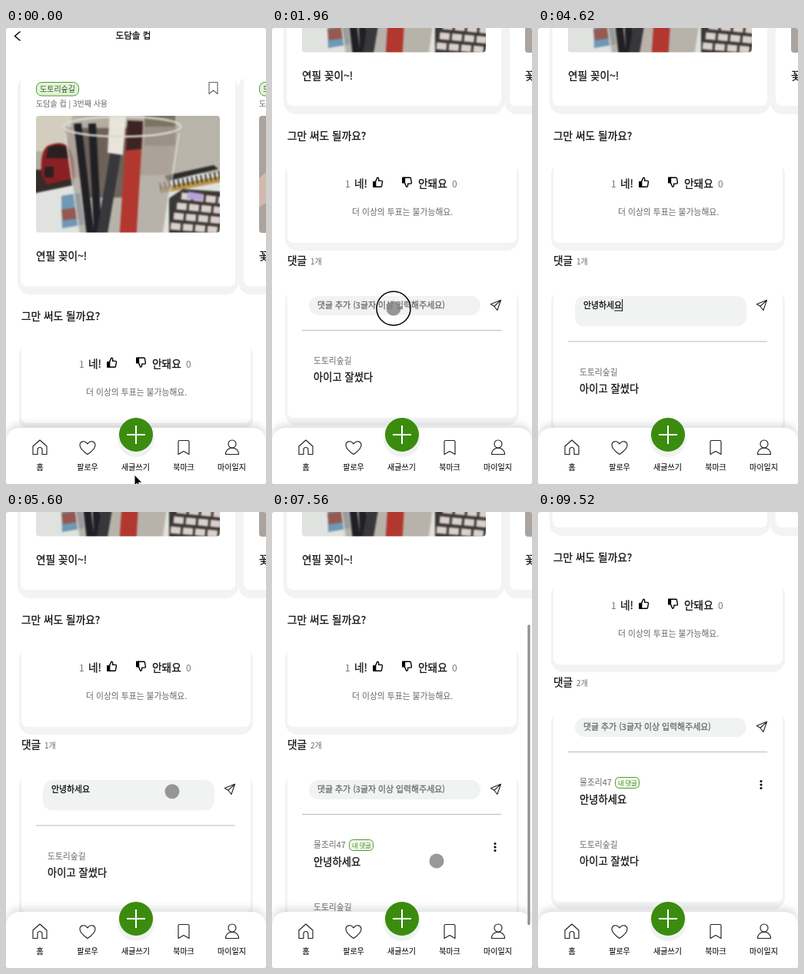
Recreate the animation shown at these times as an HTML page. Size 338 by 592 pixels, loop 9870 ms.

```html
<!DOCTYPE html>
<html lang="ko">
<head>
<meta charset="utf-8">
<style>
html, body { margin: 0; width: 100%; height: 100%; overflow: hidden; background: #c4c4c4 }
svg { display: block; width: 338px; height: 592px; background: #fff; border-radius: 3px;
  font-family: "Noto Sans CJK KR", "Noto Sans CJK", "Noto Sans CJK JP", sans-serif }
text { fill: #111 }
.card { fill: #fff }
.halo { fill: #f2f4f3 }
.bar { fill: #fff; filter: drop-shadow(0 -5px 5px rgba(20, 40, 40, .14)) }
.big, .body, .title, #input { stroke: #111; stroke-width: .28px }
.big { font-size: 13.7px }
.body { font-size: 13.3px }
.title { font-size: 11.6px; text-anchor: middle }
.name { font-size: 10.8px; fill: #666 }
.small { font-size: 10px; fill: #666 }
.vote { font-size: 12px; fill: #777 }
.nav { font-size: 10px; text-anchor: middle; stroke: #111; stroke-width: .12px }
.line { fill: none; stroke: #222; stroke-width: 1.15; stroke-linecap: round; stroke-linejoin: round }
.photo { filter: blur(.8px) }
</style>
</head>
<body>
<svg viewBox="0 0 338 592">
  <defs>
    <clipPath id="frame"><rect x="39" y="114" width="239" height="151.500" rx="4"/></clipPath>
    <g id="thumb" stroke="#000" stroke-width="2.3" stroke-linejoin="round">
      <path d="M7 22H2.500V11H7z"/>
      <path fill="none" d="M7 11l4-9a3 3 0 0 1 3 3v4h6a2 2 0 0 1 2 2l-1.500 9a2 2 0 0 1-2 2H7z"/>
    </g>
    <g id="tag">
      <rect x="39.500" y="70.500" width="55" height="17.500" rx="7" fill="#e2f3d8" stroke="#4b9a2c"/>
      <text x="44" y="83" font-size="10" style="fill:#3b5a2c">도토리숲길</text>
      <text x="39" y="102" class="small">도담솔 컵 | 3번째 사용</text>
    </g>
  </defs>

  <g id="page">
    <path class="line" style="stroke:#000;stroke-width:1.6" d="M18 5l-6.500 5.500 6.500 5.500"/>
    <text x="165.500" y="14" class="title">도담솔 컵</text>

    <rect class="halo" x="15" y="62" width="287" height="284" rx="16"/>
    <rect class="halo" x="302" y="62" width="290" height="284" rx="16"/>
    <rect class="card" x="19" y="50" width="279" height="285" rx="8"/>
    <rect class="card" x="309" y="50" width="279" height="285" rx="8"/>
    <use href="#tag"/>
    <use href="#tag" x="290"/>
    <path class="line" style="stroke:#666" d="M264 70.500h11v15l-5.500-4.500-5.500 4.500z"/>

    <g clip-path="url(#frame)"><g class="photo">
      <path fill="#b5ada0" d="M30 105h260v170H30z"/>
      <path fill="#d3cdbf" d="M30 105h58l-10 55H30z"/>
      <path fill="#b9b4a9" d="M212 105h78v90h-78z"/>
      <path fill="#7d7365" d="M180 105h40v48h-40z"/>
      <path fill="#dfe2df" d="M30 208l65-14 195-6v90H30z"/>
      <path fill="#332c28" d="M30 184h58v20l-58 12z"/>
      <path fill="#8a2023" d="M46 190q-2-30 8-37 18-8 28 2 8 14 7 40l-36 8z"/>
      <path fill="#2a2020" d="M55 155q12-6 24 0l4 14H52zM50 180h12v14H50z"/>
      <path fill="#6f98b4" d="M72 218l24-4 6 41-29 5z"/>
      <path fill="#96594f" d="M72 236l20-3 2 14-20 3z"/>
      <path fill="#2e2c2b" d="M206 192l64-14 6 5-66 16z"/>
      <path stroke="#b8964c" stroke-width="8" d="M200 211l90-17"/>
      <path stroke="#2d2926" stroke-width="10" stroke-dasharray="2 4" d="M200 206l90-17"/>
      <path fill="#3b3735" d="M212 221l18-12 60 4v65h-78z"/>
      <g stroke="#d9cfcb" stroke-width="9" stroke-dasharray="13 3">
        <path d="M228 218l54 6M222 231l60 6M218 244l64 6M214 257l68 6"/>
      </g>
      <path stroke="#b7a2d8" stroke-width="9" d="M236 217l20 3"/>
      <path fill="#a9a095" fill-opacity=".7" d="M76 128l20 150h106l22-150z"/>
      <path fill="#574a42" fill-opacity=".75" d="M92 130h82l-8 90h-62z"/>
      <path fill="none" stroke="#202024" stroke-width="10" d="M93 124l18 154M112 124l8 154"/>
      <path fill="none" stroke="#38373b" stroke-width="14" d="M143 160l-20 118"/>
      <path fill="#b2382f" d="M157 128l21-3-9 153h-22z"/>
      <path fill="#3d2424" d="M158 120l20 1-2 36-20 2z"/>
      <path fill="#e8e4da" d="M135 105h22l-5 60-20-3z"/>
      <path fill="none" stroke="#dcdedb" stroke-width="1.500" d="M77 136l20 142M225 136l-22 142"/>
      <ellipse cx="151" cy="128" rx="76" ry="13" fill="none" stroke="#d9dad6" stroke-width="2.500"/>
    </g></g>
    <path fill="#aaa39e" d="M333 114h5v152h-5a4 4 0 0 1-4-4V118a4 4 0 0 1 4-4z"/>
    <path fill="#d2b9ae" d="M329 195l9-8v40l-9 6z"/>
    <text x="39" y="301" class="big">연필 꽂이~!</text>
    <text x="329" y="301" class="big">꽃</text>

    <text x="20" y="379" class="big">그만 써도 될까요?</text>
    <rect class="halo" x="17" y="408" width="304" height="115" rx="16"/>
    <rect class="card" x="20" y="397" width="298" height="116" rx="8"/>
    <text x="95" y="441" class="vote">1</text>
    <text x="107" y="441" class="big">네!</text>
    <use href="#thumb" transform="translate(130.300 427) scale(.6)"/>
    <use href="#thumb" transform="translate(168.200 441.500) scale(.6 -.6)"/>
    <text x="190" y="441" class="big">안돼요</text>
    <text x="234" y="441" class="vote">0</text>
    <text x="104" y="477" class="name">더 이상의 투표는 불가능해요.</text>

    <text x="20" y="541" class="big">댓글</text>
    <text x="50" y="541" class="small" id="count"></text>
    <rect class="halo" id="boxhalo" x="17" y="573" width="304" rx="16"/>
    <rect class="card" id="box" x="20" y="562" width="298" rx="8"/>
    <rect id="field" x="48" y="582" width="223" rx="12.500" fill="#f1f3f3"/>
    <text x="59" y="598" font-size="10.900" id="input"></text>
    <path id="under" stroke="#111" d=""/>
    <path id="caret" stroke="#111" d=""/>
    <path class="line" style="stroke-width:1.7" transform="translate(283 586) scale(.66)"
      d="M22 2L9 14M22 2l-7 20-6-8-7-4z"/>
    <g id="low">
      <path stroke="#bbb" d="M39 626.500h259"/>
      <g id="mine">
        <text x="54" y="670" class="name">물조리47</text>
        <rect x="100.500" y="659.500" width="31" height="14" rx="5" fill="#f0f8eb" stroke="#4b9a2c"/>
        <text x="104" y="670" font-size="8.200" style="fill:#3c8a1c">내 댓글</text>
        <text x="54" y="693" class="body">안녕하세요</text>
        <path stroke="#111" stroke-width="3.200" stroke-linecap="round" d="M290 664.500v0M290 669v0M290 673.500v0"/>
      </g>
      <g id="theirs">
        <text x="54" y="670" class="name">도토리숲길</text>
        <text x="54" y="692" class="body">아이고 잘썼다</text>
      </g>
    </g>
  </g>

  <path class="bar" d="M0 600V539q0-20 20-20H318q20 0 20 20V600z"/>
  <circle cx="169" cy="533" r="24" fill="#f0f2f1"/>
  <circle cx="169" cy="528" r="22" fill="#3b8c0e"/>
  <path stroke="#fff" stroke-width="2" d="M157 528h24M169 516v24"/>
  <g class="line">
    <path d="M35 543l9-8 9 8v10.500h-6v-6a3 3 0 0 0-6 0v6h-6z"/>
    <path d="M106 553.500c-6-4-10-8-10-12 0-5.500 7-6.500 10-1.500 3-5 10-4 10 1.500 0 4-4 8-10 12z"/>
    <path d="M224 537q0-1.500 1.500-1.500h11q1.500 0 1.500 1.500v16.500l-7-4-7 4z"/>
    <circle cx="294" cy="540" r="5"/>
    <path d="M285.500 553.500c0-4 3-7 6-8h5c3 1 6 4 6 8z"/>
  </g>
  <text class="nav" x="44" y="573.500">홈</text>
  <text class="nav" x="106" y="573.500">팔로우</text>
  <text class="nav" x="168.500" y="573.500">새글쓰기</text>
  <text class="nav" x="231" y="573.500">북마크</text>
  <text class="nav" x="293.500" y="573.500">마이일지</text>

  <rect id="scrollbar" x="332.300" width="3.300" rx="1.650" fill="#919191"/>
  <circle id="ring" fill="none" stroke="#000" stroke-width="1.500"/>
  <circle id="dot" r="9.500" fill-opacity=".8"/>
  <path id="arrow" stroke="#fff" d="M0 0v14l3.200-2.800 2.300 5 2.300-1-2.300-5h4.500z"/>
</svg>
<script>
const LOOP = 9870, STEP = 70, HINT = '댓글 추가 (3글자 이상 입력해주세요)';
const FOCUS = 2030, BLUR = 6160, POST = 6440;
const typed = [[0, ''], [2380, 'd'], [3080, ''], [3360, 'ㅇ'], [3570, '아'], [3710, '안'], [3780, '안ㄴ'],
  [3920, '안녕'], [3990, '안녕ㅎ'], [4130, '안녕하'], [4270, '안녕핫'], [4340, '안녕하세'],
  [4480, '안녕하셍'], [4620, '안녕하세요'], [POST, '']];
// time, x, y
const route = [[0, 167, 580], [280, 186, 470], [910, 186, 470], [1400, 158, 364], [5180, 158, 364],
  [6090, 289, 361], [6860, 289, 361], [7490, 214, 453], [7910, 214, 453], [8960, 205, 505],
  [9030, 205, 505], [9520, 212, 603], [LOOP, 212, 603]];

const $ = id => document.getElementById(id);
const set = (id, attrs) => { for (const k in attrs) $(id).setAttribute(k, attrs[k]); };
const show = (id, on) => set(id, { visibility: on ? 'visible' : 'hidden' });
const within = (t, a, b) => t >= a && t < b;
const decay = t => Math.exp(-.0181 * t);
const fade = (t, from) => Math.max(0, Math.min(1, 1 - (t - from) / 490));

function pointer(t) {
  const i = route.findIndex(p => p[0] > t), [t0, x0, y0] = route[i - 1], [t1, x1, y1] = route[i];
  const u = (t - t0) / (t1 - t0), e = u * u * (3 - 2 * u);
  return [x0 + (x1 - x0) * e, y0 + (y1 - y0) * e];
}

function scrollAt(t) {
  if (t < 420) return 0;
  return t < 7560 ? 234 * (1 - decay(t - 380)) : 315 - 81 * decay(t - 7560);
}

function drawInput(t) {
  const text = typed.filter(p => p[0] <= t).pop()[1];
  $('input').textContent = text || HINT;
  $('input').style.fill = $('input').style.stroke = text ? '#111' : '#6b6b6b';
  const end = 59 + (text ? $('input').getComputedTextLength() : 0);
  set('caret', { d: `M${end + .5} 586v16` });
  set('under', { d: `M${end - 10} 601h10` });
  show('caret', within(t, FOCUS, 2940) || within(t, 3360, 5110));
  show('under', within(t, 3360, 5110));
}

function drawPointer(t) {
  const [x, y] = pointer(t);
  set('arrow', { transform: `translate(${x} ${y})` });
  show('arrow', t < 980);
  const lit = within(t, BLUR + STEP, BLUR + 2 * STEP);
  set('dot', { cx: x, cy: y, fill: lit ? '#5a7d8a' : '#808080' });
  show('dot', within(t, 980, 2380) || t >= 5110);
  const r = t < 6160 ? 22 : t < 6300 ? 28 : 36;
  set('ring', { cx: x, cy: y, r, opacity: t < 6160 ? 1 : .4 });
  show('ring', within(t, 1470, FOCUS) || within(t, 6090, 6230) || within(t, 6300, 6370));
}

function draw(now) {
  const t = Math.floor(now % LOOP / STEP) * STEP;
  const scroll = scrollAt(t), posted = t >= POST;
  const grow = within(t, FOCUS, BLUR) ? 14.5 : 0, added = posted ? 81 : 0;
  set('page', { transform: `translate(0 ${-Math.round(scroll)})` });
  set('box', { height: 178 + grow + added });
  set('boxhalo', { height: 177 + grow + added });
  set('field', { height: 25 + grow });
  set('low', { transform: `translate(0 ${grow})` });
  set('theirs', { transform: `translate(0 ${added})` });
  show('mine', posted);
  $('count').textContent = posted ? '2개' : '1개';

  const height = posted ? 390 : 428, limit = posted ? 315 : 234;
  set('scrollbar', {
    height, y: (587 - height) * scroll / limit,
    opacity: within(t, 420, 1470) ? fade(t, 910) : t >= 7560 ? fade(t, 8120) : 0
  });
  drawInput(t);
  drawPointer(t);
}

const start = performance.now();
function tick() {
  draw(performance.now() - start);
  requestAnimationFrame(tick);
}
tick();
</script>
</body>
</html>
```
